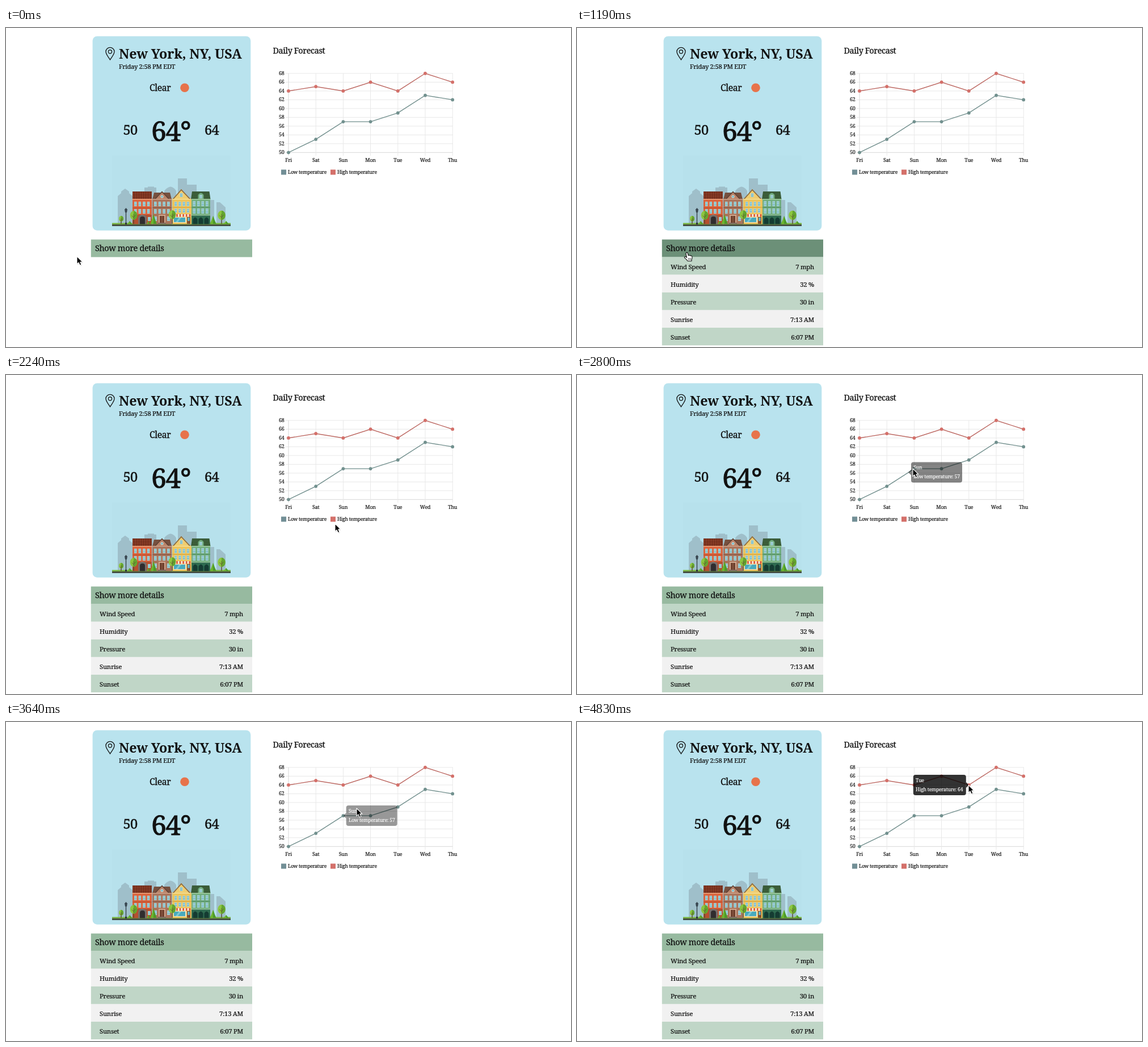
Animation of 996x562 px, one loop 5180 ms. Source, as an HTML page:

```html
<!DOCTYPE html>
<html lang="en">
<head>
<meta charset="utf-8">
<title>Weather</title>
<style>
  html, body { margin: 0; width: 100%; height: 100%; overflow: hidden; background: #fff; }
  svg { display: block; width: 996px; height: 562px; }
  text {
    font-family: "Noto Serif", serif; letter-spacing: -.026em; white-space: pre;
    fill: #111; stroke: #111; stroke-width: .02em;
  }
  .title { font-weight: 700; letter-spacing: -.009em; stroke: none; }
  .end { text-anchor: end; }
  .mid { text-anchor: middle; }
  .tip text { fill: #fff; stroke: #fff; }
</style>
</head>
<body>
<svg id="stage" viewBox="0 0 996 562" xmlns="http://www.w3.org/2000/svg"></svg>
<script>
const LOOP = 5180, STEP = 70;

const rect = (x, y, w, h, fill, more = '') =>
  `<rect x="${x}" y="${y}" width="${w}" height="${h}" fill="${fill}" ${more}/>`;
const path = (d, fill, more = '') => `<path d="${d}" fill="${fill}" ${more}/>`;
const dot = (x, y, r, fill, more = '') =>
  `<circle cx="${x}" cy="${y}" r="${r}" fill="${fill}" ${more}/>`;
const text = (x, y, size, str, cls = '') =>
  `<text x="${x}" y="${y}" font-size="${size}" class="${cls}">${str}</text>`;
const each = (n, fn) => Array.from({ length: n }, (_, i) => fn(i)).join('');

// City illustration
const win = (x, y, w = 5, h = 8) =>
  rect(x, y, w, h, '#d9e6e0') + rect(x + .5, y + .5, w - 1, h - 1, '#6cb8c8') +
  rect(x + w / 2 - .25, y, .5, h, '#d9e6e0') + rect(x, y + h * .4, w, .5, '#d9e6e0');
const winRow = (x, y, n, gap, w, h) => each(n, i => win(x + i * gap, y, w, h));

const tree = (x, y, r) =>
  rect(x - .7, y, 1.4, 345 - y, '#5b4630') +
  `<ellipse cx="${x}" cy="${y}" rx="${r * .9}" ry="${r * 1.1}" fill="#8cc63f"/>` +
  path(`M${x} ${y - r * 1.1}A${r * .9} ${r * 1.1} 0 0 1 ${x} ${y + r * 1.1}Z`, '#63a52f') +
  path(`M${x} ${y + r}V${y - r * .3}M${x} ${y + 3}l${r * .5} ${-r * .5}M${x} ${y + 4}l${-r * .5} ${-r * .5}`,
    'none', 'stroke="#5b4630" stroke-width=".7"');
const bush = (x, w, h) =>
  path(`M${x - w / 2} 345Q${x - w / 4} ${345 - h * .4} ${x} ${345 - h}Q${x + w / 4} ${345 - h * .4} ${x + w / 2} 345Z`, '#6cb52d') +
  path(`M${x} ${345 - h}Q${x + w / 4} ${345 - h * .4} ${x + w / 2} 345H${x}Z`, '#4c9a2a');

function city() {
  const skyline = path('M197 346V296L203 291V288L210 283L217 288V291L223 296V346Z' +
    'M244 346V281H250V279.5H261V281H265V346ZM279 346V287Q283 281 290 279.5Q297 281 300 287V346Z' +
    'M303 346V265H319V276H336V346ZM358 346V303H367V346ZM371 346V307H377L387 316V346Z', '#9fbfca');

  const red = rect(223, 300, 34, 46, '#d9633d') + rect(223, 288, 34, 14, '#7a3320') +
    each(5, i => rect(223, 290 + i * 2.5, 34, .6, '#a04a2d')) +
    each(8, i => rect(226 + i * 4, 288, .6, 14, '#5f2618')) +
    rect(222.5, 301, 35, 1.6, '#e9a27b') + rect(223, 316.5, 34, 1.2, '#b94c2c') +
    winRow(226, 306, 4, 7.6, 4.5, 8) + winRow(226, 319, 4, 7.6, 4.5, 8) +
    rect(223, 329, 34, 17, '#b5502f') +
    path('M233 346V335Q233 329 240.5 329Q248 329 248 335V346Z', '#766f6c') +
    path('M236 346V336Q236 332 240.5 332Q245 332 245 336V346Z', '#302d2f') +
    win(250, 333, 5, 7);

  const brown = rect(258, 300, 34, 46, '#a9745c') + path('M258 302L261 290H289L292 302Z', '#76503f') +
    path('M264 301L275 288.5L286 301Z', '#b98369') +
    path('M263 301L275 288.5L287 301', 'none', 'stroke="#5d4034" stroke-width="1.4"') +
    dot(275, 297, 2.5, '#e9f1ea') + dot(275, 297, 1.7, '#62b5c6') +
    rect(257.5, 301, 35, 1.4, '#d0a58c') + rect(258, 316, 34, 1, '#815341') +
    winRow(261, 306, 4, 7.7, 4.5, 8) + winRow(261, 319, 4, 7.7, 4.5, 8) +
    rect(269, 329, 12, 17, '#d0a58c') + rect(271, 331, 8, 13, '#70422f') +
    rect(274.7, 331, .6, 13, '#a9745c') + rect(268, 343, 14, 2.5, '#7c6a60') +
    win(261, 332, 5, 8) + win(284, 332, 5, 8);

  const yellow = rect(293, 300, 34, 46, '#ecc45d') + path('M296 301L309 284L323 301Z', '#efcd70') +
    path('M294 302L309 285L325 302', 'none', 'stroke="#8e6a3b" stroke-width="1.8"') +
    win(306.5, 291, 5, 7) + rect(293, 301, 34, 1.2, '#f8e4a4') + rect(293, 315.5, 34, 1, '#cf9e3f') +
    winRow(297, 306, 4, 7.2, 4.5, 8) + winRow(297, 318, 4, 7.2, 4.5, 7.5) +
    rect(295, 333, 23, 10, '#efe3bf') + rect(296, 334, 20, 8, '#49aabd') +
    path('M299 342L305 334H309L303 342Z', '#7bc8d3') +
    rect(319, 333, 6, 12, '#85502f') + rect(320.2, 334, 3.6, 6, '#62b5c6') +
    each(11, i => path(`M${294.5 + i * 2.8} 328h2.8v4q-1.4 1.6 -2.8 0Z`, i % 2 ? '#f6ece1' : '#dc5a43'));

  const green = rect(327, 300, 33, 46, '#70ad80') + path('M326 302L328 288H358.5L360.5 302Z', '#385a37') +
    each(4, i => rect(328, 290.5 + i * 2.8, 31, .5, '#486b42')) +
    path('M338.5 302V294Q343.5 287 348.5 294V302Z', '#70ad80') + win(341.2, 294, 4.6, 6) +
    rect(326.5, 301, 34, 1.4, '#a7d0a4') + rect(327, 315.5, 33, 1, '#4c8a60') +
    winRow(329.5, 305, 4, 7.5, 4.5, 9) + winRow(329.5, 318, 4, 7.5, 4.5, 9) +
    rect(327, 329, 33, 17, '#2f6b50') + rect(326.5, 329, 34, 1.4, '#9dc79c') +
    each(3, i => path(`M${329.5 + i * 10} 346v-9q4 -7 8 0v9Z`, '#153c32'));

  const lamp = rect(210.9, 324, 1.2, 22, '#28323a') + path('M209 319H214L213 325H210Z', '#384650') +
    rect(210, 343, 3, 3, '#28323a') + rect(210.5, 317.5, 2, 1.5, '#28323a');

  return rect(187, 225, 209, 124, '#b7e1ec') + skyline + red + brown + yellow + green +
    rect(187, 343.5, 36, 2.5, '#7dbb42') + rect(360, 343.5, 36, 2.5, '#7dbb42') +
    rect(187, 345.5, 209, 1.5, '#62813c') + rect(187, 346.5, 209, 2.5, '#434b42') + lamp +
    tree(203, 336, 4.5) + tree(225, 330, 7) + tree(293, 329, 7) + tree(380, 330, 7.5) +
    bush(260, 11, 17) + bush(251, 6, 5) + bush(365, 11, 14) + bush(218, 8, 5) + bush(388, 9, 5);
}

function card() {
  return rect(152.6, 14.5, 278.7, 342.2, '#b9e3ee', 'rx="8"') +
    path('M183.5 56C180 50 176 46.5 176 41.5A7.5 7.2 0 0 1 191 41.5C191 46.5 187 50 183.5 56Z', 'none',
      'stroke="#111" stroke-width="1.3"') +
    dot(183.5, 41.8, 3.1, 'none', 'stroke="#111" stroke-width="1.2"') +
    text(199, 54, 23.3, 'New York, NY, USA', 'title') +
    text(199, 71.7, 11.2, 'Friday 2:58 PM EDT') +
    text(253, 111, 15.8, 'Clear') +
    dot(315, 105.2, 7.8, '#e7734b') +
    text(206.5, 188.3, 23.5, '50') + text(256, 198.5, 48, '64°') + text(350, 188.3, 23.5, '64') +
    city();
}

function details() {
  const rows = [['Wind Speed', '7 mph'], ['Humidity', '32 %'], ['Pressure', '30 in'],
    ['Sunrise', '7:13 AM'], ['Sunset', '6:07 PM']];
  const h = 31.1;
  return rows.map(([name, value], i) =>
    rect(149.8, 403.6 + i * h, 284.2, h, i % 2 ? '#f1f1f1' : '#c0d6c7') +
    text(165, 424.6 + i * h, 11.4, name) + text(418, 424.6 + i * h, 11.4, value, 'end')).join('');
}

// Forecast chart
const px = i => 498 + i * 48.2;
const py = v => 219.3 - (v - 50) * 7.74;

function series(values, line, color) {
  const d = 'M' + values.map((v, i) => `${px(i)} ${py(v)}`).join('L');
  return path(d, 'none', `stroke="${line}" stroke-width="1.4"`) +
    values.map((v, i) => dot(px(i), py(v), 2.9, color)).join('');
}

function chart() {
  const days = ['Fri', 'Sat', 'Sun', 'Mon', 'Tue', 'Wed', 'Thu'];
  const low = '#72918f', high = '#d4706a';
  return text(470.5, 45, 14.4, 'Daily Forecast') +
    each(10, i => rect(493, py(50 + i * 2) - .5, 295, 1, i ? '#e8e8e8' : '#d8d8d8') +
      text(490.5, py(50 + i * 2) + 3, 8.9, 50 + i * 2, 'end')) +
    days.map((day, i) => rect(px(i) - .5, py(68), 1, 145, i ? '#e8e8e8' : '#d8d8d8') +
      text(px(i), 236.3, 8.9, day, 'mid')).join('') +
    series([50, 53, 57, 57, 59, 63, 62], '#6f8d8b', low) +
    series([64, 65, 64, 66, 64, 68, 66], '#bd6963', high) +
    rect(485, 249.5, 9, 9, '#728f96') + text(497, 257, 8.6, 'Low temperature') +
    rect(572, 249.5, 9, 9, high) + text(584, 257, 8.6, 'High temperature');
}

const tip = (id, w, caret, day, label) =>
  `<g class="tip" id="${id}">` + rect(0, 0, w, 36, '#000', 'rx="4" fill-opacity=".8"') +
  path(caret, '#000', 'fill-opacity=".8"') +
  text(4.3, 12.8, 8.6, day) + text(4.3, 28.8, 8.6, label) + '</g>';

const arrow = '<g id="arrow">' +
  path('M1 1.5V15L4 12.2L6.3 17L8.7 16L6.5 11.2H10.6Z', '#000', 'opacity=".18"') +
  path('M0 0V13.7L3.1 10.9L5.3 15.8L7.9 14.7L5.8 9.9H9.9Z', '#000',
    'stroke="#fff" stroke-width="1.1" stroke-linejoin="round"') + '</g>';
const hand = '<g id="hand">' +
  path('M-1.6 1.3Q-.2 -.5 1 1.3L2.3 6Q3.4 4.6 4.6 6Q6 5 6.9 6.6Q8.6 6 8.9 8Q9.4 11 8 13V15.5H1L-1.2 12.6L-4.6 9.6Q-4.7 7.4 -2.5 8L-.5 9.4L-2 2.6Z',
    '#fff', 'stroke="#111" stroke-width="1.1" stroke-linejoin="round"') +
  path('M2.4 10.5V13.5M4.5 10.5V13.5M6.5 10.5V13.5', 'none', 'stroke="#111" stroke-width=".8"') + '</g>';

const stage = document.getElementById('stage');
stage.innerHTML = rect(0, 0, 996, 562, '#fff') + card() +
  rect(149.8, 372.6, 284.2, 31, '#97baa0', 'id="bar"') + text(157, 393.2, 14.5, 'Show more details') +
  `<g id="details">${details()}</g>` + chart() +
  tip('lowTip', 90, 'M0 13L-5 18L0 23Z', 'Sun', 'Low temperature: 57') +
  tip('highTip', 93, 'M93 13L98 18L93 23Z', 'Tue', 'High temperature: 64') +
  arrow + hand;

// Timelines: [ms, values...]
const cursorPath = [[70, 125, 402.3], [210, 131, 410], [350, 152, 405], [420, 168, 399], [490, 181, 396],
  [1120, 183, 396], [1260, 205, 394], [1400, 335, 386], [1540, 459, 377], [1610, 530, 371],
  [1680, 566, 369], [1750, 571, 367], [1960, 571, 367], [2100, 573, 345], [2240, 580, 262],
  [2380, 588, 186], [2520, 591, 166], [2660, 592, 165], [3430, 592, 165], [3570, 603, 160],
  [3640, 618, 152], [3780, 662, 127], [3920, 685, 113], [4060, 690, 111]];
const barShade = [[280, 0], [490, 1], [1540, 1], [1680, 0]];
const lowTipPath = [[2660, 575, 163, 0], [2730, 581, 159, .28], [2800, 589, 153.5, .6], [2870, 594.5, 150, .8],
  [3010, 598.7, 147.7, .95], [3290, 599.7, 147, 1], [3500, 599.7, 147, 1], [3640, 599.7, 147, .5], [3780, 599.7, 147, 0]];
const highTipPath = [[4340, 599.7, 147, 0], [4410, 598, 133, .15], [4480, 595, 111, .58],
  [4550, 593.5, 99.5, .83], [4620, 593, 95, .94], [4830, 592.8, 93, 1]];

function at(table, t) {
  const next = table.findIndex(row => row[0] > t);
  if (next === 0) return table[0].slice(1);
  if (next < 0) return table[table.length - 1].slice(1);
  const a = table[next - 1], b = table[next], k = (t - a[0]) / (b[0] - a[0]);
  return a.slice(1).map((v, i) => v + (b[i + 1] - v) * k);
}

const el = id => document.getElementById(id);
const place = (node, x, y, opacity) => {
  node.setAttribute('transform', `translate(${x} ${y})`);
  node.setAttribute('opacity', opacity);
};
const mix = (a, b, k) => `rgb(${a.map((v, i) => Math.round(v + (b[i] - v) * k))})`;

function draw(now) {
  const t = Math.floor((now % LOOP) / STEP) * STEP;
  const [x, y] = at(cursorPath, t);
  const pointing = x > 150 && x < 434 && y < 404;
  place(el('arrow'), x, y, pointing ? 0 : 1);
  place(el('hand'), x, y, pointing ? 1 : 0);
  el('bar').setAttribute('fill', mix([151, 186, 160], [108, 144, 120], at(barShade, t)[0]));
  el('details').setAttribute('opacity', t >= 630 ? 1 : 0);
  place(el('lowTip'), ...at(lowTipPath, t));
  place(el('highTip'), ...at(highTipPath, t));
}

const start = performance.now();
function tick() {
  draw(performance.now() - start);
  requestAnimationFrame(tick);
}
tick();
</script>
</body>
</html>
```
